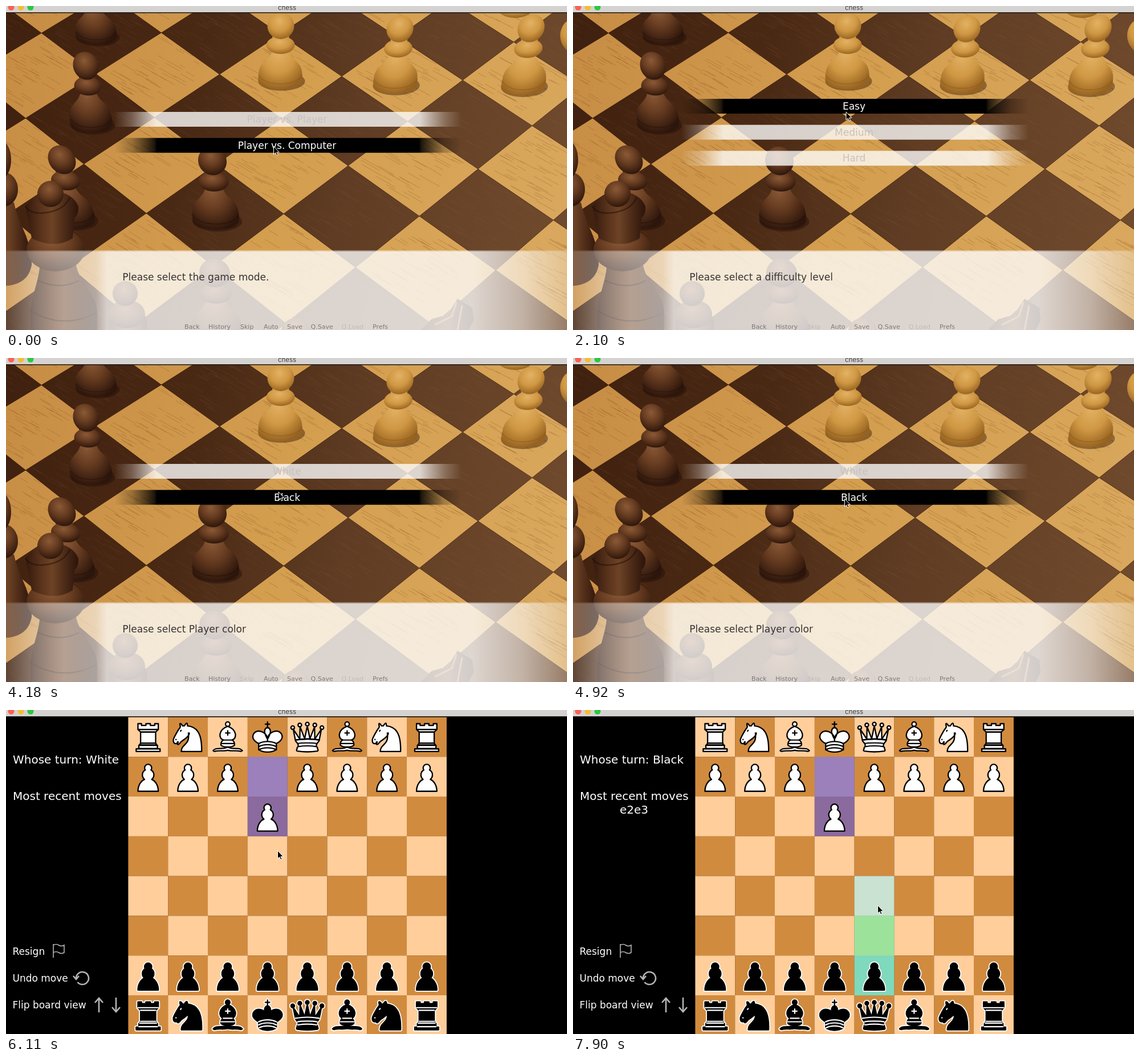
An HTML page for the animation above (8 s loop, 984 by 569 pixels).

```html
<!DOCTYPE html>
<html lang="en">
<head>
<meta charset="utf-8">
<title>chess</title>
<style>
html, body { margin: 0; width: 100%; height: 100%; overflow: hidden; background: #000; }
svg { display: block; width: 984px; height: 569px; }
text { font-family: "DejaVu Sans", sans-serif; font-size: 17px; }
.mid { text-anchor: middle; }
.side { fill: #fff; }
.big { font-size: 20px; }
.quick { font-size: 11px; fill: #6f6a66; fill-opacity: .85; }
.off { fill: #8f8681; fill-opacity: .32; }
.icon { fill: none; stroke: #b4b4b4; stroke-width: 2.6; }
</style>
</head>
<body>
<svg viewBox="0 0 984 569" xmlns="http://www.w3.org/2000/svg">
  <defs>
    <linearGradient id="darkTile" gradientUnits="userSpaceOnUse" x1="0" y1="120" x2="984" y2="330">
      <stop offset="0" stop-color="#40210f"/><stop offset=".33" stop-color="#4a2914"/>
      <stop offset=".62" stop-color="#5f3c23"/><stop offset="1" stop-color="#704a2d"/>
    </linearGradient>
    <linearGradient id="lightTile" gradientUnits="userSpaceOnUse" x1="0" y1="100" x2="984" y2="400">
      <stop offset="0" stop-color="#c78d45"/><stop offset=".5" stop-color="#d49e4f"/><stop offset="1" stop-color="#d9a85e"/>
    </linearGradient>
    <linearGradient id="darkBody">
      <stop offset="0" stop-color="#33190e"/><stop offset=".3" stop-color="#5a331b"/>
      <stop offset=".5" stop-color="#6d4325"/><stop offset=".75" stop-color="#4c2a17"/><stop offset="1" stop-color="#2a140b"/>
    </linearGradient>
    <radialGradient id="darkBall" cx=".45" cy=".32" r=".7">
      <stop offset="0" stop-color="#8b5a37"/><stop offset=".5" stop-color="#643a1f"/><stop offset="1" stop-color="#2c150b"/>
    </radialGradient>
    <radialGradient id="lightBall" cx=".45" cy=".32" r=".7">
      <stop offset="0" stop-color="#e3b264"/><stop offset=".55" stop-color="#cf9743"/><stop offset="1" stop-color="#96621f"/>
    </radialGradient>
    <linearGradient id="idleBar">
      <stop offset="0" stop-color="#fff" stop-opacity="0"/><stop offset=".05" stop-color="#fff" stop-opacity=".25"/>
      <stop offset=".12" stop-color="#fff" stop-opacity=".78"/><stop offset=".88" stop-color="#fff" stop-opacity=".78"/>
      <stop offset=".95" stop-color="#fff" stop-opacity=".25"/><stop offset="1" stop-color="#fff" stop-opacity="0"/>
    </linearGradient>
    <linearGradient id="hoverBar">
      <stop offset="0" stop-opacity="0"/><stop offset=".05" stop-opacity=".25"/>
      <stop offset=".115" stop-opacity=".85"/><stop offset=".123" stop-opacity="1"/>
      <stop offset=".877" stop-opacity="1"/><stop offset=".885" stop-opacity=".85"/>
      <stop offset=".95" stop-opacity=".25"/><stop offset="1" stop-opacity="0"/>
    </linearGradient>
    <linearGradient id="sayBox">
      <stop offset="0" stop-color="#fff" stop-opacity=".15"/><stop offset=".05" stop-color="#fff" stop-opacity=".4"/>
      <stop offset=".16" stop-color="#fff" stop-opacity=".6"/><stop offset=".18" stop-color="#fff" stop-opacity=".78"/>
      <stop offset=".83" stop-color="#fff" stop-opacity=".78"/><stop offset=".92" stop-color="#fff" stop-opacity=".58"/>
      <stop offset="1" stop-color="#fff" stop-opacity=".28"/>
    </linearGradient>
  </defs>

  <g id="photo"></g>
  <g id="say">
    <rect y="429" width="984" height="2" fill="url(#sayBox)" opacity=".55"/>
    <rect y="431" width="984" height="138" fill="url(#sayBox)"/>
    <text id="line" x="204.3" y="482" fill="#383432"></text>
  </g>
  <g id="quick"></g>
  <g id="menu"></g>

  <g id="game">
    <rect y="12" width="984" height="557"/>
    <g id="board"></g>
    <g id="marks"></g>
    <g id="men"></g>
    <text id="turn" class="side big" x="12" y="94"></text>
    <text class="side big" x="12" y="158">Most recent moves</text>
    <text id="moves" class="side big mid" x="107" y="182">e2e3</text>
    <text class="side" x="11.5" y="430">Resign</text>
    <text class="side" x="11.5" y="477">Undo move</text>
    <text class="side" x="11.5" y="524">Flip board view</text>
    <path class="icon" style="stroke-width:1.6" d="M83 411V435M83 413q5-3 9.500 0t9.500 0v13q-5 3-9.500 0t-9.500 0"/>
    <path class="icon" d="M125.500 478A11 11 0 1 0 123 471M118 467l5 6 5-6"/>
    <path class="icon" d="M163 531V507M156 514l7-8 7 8M193 505V529M186 522l7 8 7-8"/>
  </g>

  <rect width="984" height="11.500" fill="#d5d3d1"/>
  <rect y="11" width="984" height="1.500" fill="#1c1816"/>
  <circle cx="9" cy="2.300" r="5.500" fill="#fd5f57"/>
  <circle cx="26" cy="2.300" r="5.500" fill="#f8bc30"/>
  <circle cx="43" cy="2.300" r="5.500" fill="#2ac940"/>
  <text class="mid" x="493" y="6.500" style="font:11.5px Inter,sans-serif" fill="#444">chess</text>
  <path id="cursor" d="M0 0V14L3.200 11.200 5.300 16 7.500 15 5.400 10.400H9.700Z" stroke="#fff" stroke-width="1"/>
</svg>

<script>
const $ = id => document.getElementById(id);
const show = (el, on) => el.setAttribute('visibility', on ? 'visible' : 'hidden');

let seed = 7;
const rnd = () => (seed = seed * 16807 % 2147483647) / 2147483647;

// Perspective of the wooden board, with a slight lens bend: grid to stage
function spot(i, j) {
  const w = 1 - .036 * i + .042 * j;
  const x = (487 + 104 * i + 138.3 * j) / w;
  const y = (365 + 76.5 * i - 72.8 * j) / w + i * (1 + 1.5 * j);
  return x.toFixed(1) + ' ' + y.toFixed(1);
}

function woodBoard() {
  let dark = '', light = '', grain = '', weave = '';
  for (let i = -6; i < 4; i++) for (let j = -4; j < 6; j++) {
    const tile = `M${spot(i, j)}L${spot(i + 1, j)}L${spot(i + 1, j + 1)}L${spot(i, j + 1)}Z`;
    const even = (i + j) % 2 === 0;
    if (even) dark += tile; else light += tile;
    for (let k = 0; k < 45; k++) {
      const u = i + .02 + rnd() * .7, v = j + .05 + rnd() * .93, len = .08 + rnd() * .18;
      const dash = `M${spot(u, v)}L${spot(u + len, v + len * .12)}`;
      if (even) weave += dash; else grain += dash;
    }
  }
  return `<path d="${light}" fill="url(#lightTile)"/>
    <path d="${dark}" fill="url(#darkTile)" stroke="#3a1d0e" stroke-opacity=".5" stroke-width=".8"/>
    <path d="${grain}" stroke="#7a4616" stroke-opacity=".3"/>
    <path d="${weave}" stroke="#8f6242" stroke-opacity=".16"/>`;
}

// Turned pawn, in units of the head radius; 4.8 units from head centre to foot
function woodPawn(hx, hy, r, bx, foot, kind) {
  const edge = kind === 'dark' ? '#1f0d06' : '#8a5518', skin = `url(#${kind}Ball)`;
  return `<g transform="matrix(${r} 0 ${(bx - hx) / 4.8} ${(foot - hy) / 4.8} ${hx} ${hy})">
    <ellipse cx=".1" cy="4.2" rx="1.75" ry=".72" fill="#1c0c05" opacity=".4"/>
    <path fill="${skin}" d="M-.62 .7L-.62 1.9C-.8 2.6-1.45 2.65-1.6 3.4C-1.64 3.7-1.66 3.9-1.64 4.15C-1.55 4.6-.85 4.8 0 4.8C.85 4.8 1.55 4.6 1.64 4.15C1.66 3.9 1.64 3.7 1.6 3.4C1.45 2.65 .8 2.6 .62 1.9L.62 .7Z"/>
    <path fill="none" stroke="${edge}" stroke-opacity=".5" stroke-width=".06" d="M-1.62 3.75Q-1.2 4.4 0 4.4T1.62 3.75"/>
    <ellipse cy="1.45" rx="1.06" ry=".68" fill="${skin}"/>
    <circle r="1" fill="${skin}"/></g>`;
}

const ball = (x, y, rx, ry, kind = 'dark') =>
  `<ellipse cx="${x}" cy="${y}" rx="${rx}" ry="${ry}" fill="url(#${kind}Ball)"/>`;
const body = d => `<path d="${d}" fill="url(#darkBody)"/>`;

$('photo').innerHTML = woodBoard() +
  ball(893, 2, 32, 19, 'light') + ball(1002, 52, 30, 32, 'light') +
  woodPawn(150, -36, 22, 160, 68, 'dark') +
  woodPawn(482, 35, 23.5, 481, 146, 'light') +
  woodPawn(691, 40, 23.5, 681, 154, 'light') +
  woodPawn(921, 39, 23.5, 905, 157, 'light') +
  woodPawn(140, 105, 22.5, 151, 223, 'dark') +
  woodPawn(98, 270, 24, 120, 391, 'dark') +
  woodPawn(362, 272, 25, 369, 393, 'dark') +
  // tall piece at the left edge
  body('M-40 350L14 345C22 385 46 410 45 455C40 482 20 492-10 492L-40 490Z') +
  ball(-4, 322, 25, 30) + ball(-10, 270, 19, 34) +
  // queen
  body('M60 450C57 490 44 505 43 545V569H160V540C160 505 128 490 122 450Z') +
  '<path d="M43 535Q100 570 160 538M56 482Q95 500 128 482" fill="none" stroke="#1f0d06" stroke-opacity=".6" stroke-width="2"/>' +
  ball(87, 428, 51, 38) +
  body('M34 352Q54 324 80 324Q118 328 127 352Q128 366 120 373L117 408Q85 428 45 408Z') +
  '<path d="M34 352Q44 368 76 362Q104 356 112 336" fill="none" stroke="#1f0d06" stroke-opacity=".5" stroke-width="2.5"/>' +
  ball(78, 330, 23, 23) +
  woodPawn(366, 469, 27, 370, 590, 'dark') +
  body('M198 520Q178 535 180 569H248Q248 538 228 520Z') + ball(212, 541, 32, 25) + ball(209, 505, 22, 22) +
  ball(508, 571, 25, 23) +
  // knight
  body('M728 569L746 550L774 542L792 514L818 530L820 552L812 569Z') +
  '<path d="M752 560L782 545L790 520M800 526L792 569" fill="none" stroke="#c18a58" stroke-opacity=".7" stroke-width="3"/>';

$('quick').innerHTML = [['Back', 313], ['History', 355], ['Skip', 411], ['Auto', 452], ['Save', 493],
  ['Q.Save', 534.5], ['Q.Load', 588.5], ['Prefs', 643]].map(([s, x]) =>
  `<text class="quick${s === 'Q.Load' ? ' off' : ''}" x="${x}" y="567">${s}</text>`).join('');
const skip = $('quick').children[2];

// Flat pieces on a 45 unit square: [outline, inner lines]
const art = {
  p: ['M22.5 9c-2.21 0-4 1.79-4 4 0 .89.29 1.71.78 2.38C17.33 16.5 16 18.59 16 21c0 2.03.94 3.84 2.41 5.03-3 1.06-7.41 5.55-7.41 13.47h23c0-7.92-4.41-12.41-7.41-13.47 1.47-1.19 2.41-3 2.41-5.03 0-2.41-1.33-4.5-3.28-5.62.49-.67.78-1.49.78-2.38 0-2.21-1.79-4-4-4z', ''],
  r: ['M9 39h27v-3H9zM12 36v-4h21v4zM14 29.5V17h17v12.5zM14 29.5h17l1.5 2.5h-20zM14 17l-3-3h23l-3 3zM11 14V7.5h4v2h5v-2h5v2h5v-2h4V14z',
    'M12 35.5h21M13 31.5h19M14 29.5h17M14 17h17M11 14h23'],
  n: ['M22 10c10.5 1 16.5 8 16 29H15c0-9 10-6.5 8-21M24 18c.38 2.91-5.55 7.37-8 9-3 2-2.82 4.34-5 4-1.04-.94 1.41-3.04 0-3-1 0 .19 1.23-1 2-1 0-4 1-4-4 0-2 6-12 6-12s1.89-1.9 2-3.5c-.73-1-.5-2-.5-3 1-1 3 2.5 3 2.5h2s.78-2 2.500-3c1 0 1 3 1 3',
    'M9 25.3v.4M14.8 15l-.6 1'],
  b: ['M9 36c3.39-.97 10.11.43 13.5-2 3.39 2.43 10.11 1.03 13.5 2 0 0 1.65.54 3 2-.68.97-1.65.99-3 .5-3.39-.97-10.11.46-13.5-1-3.39 1.46-10.11.03-13.5 1-1.35.49-2.32.47-3-.5 1.35-1.46 3-2 3-2zM15 32c2.5 2.5 12.5 2.5 15 0 .5-1.5 0-2 0-2 0-2.5-2.5-4-2.5-4 5.5-1.5 6-11.5-5-15.5-11 4-10.5 14-5 15.5 0 0-2.5 1.5-2.5 4 0 0-.5.5 0 2zM25 8a2.5 2.5 0 1 1-5 0 2.5 2.5 0 1 1 5 0z',
    'M17.5 26h10M15 30h15M22.5 15.5v5M20 18h5'],
  k: ['M22.5 11.600V5.500M20 8h5M22.5 25s4.5-7.5 3-10.5c0 0-1-2.5-3-2.500s-3 2.5-3 2.500c-1.5 3 3 10.5 3 10.5M12.5 37c5.5 3.5 14.5 3.5 20 0v-7s9-4 6-10.5c-4-6.5-13.5-3.5-16 4V27v-3.5c-2.5-7.5-12-10.5-16-4-3 6.5 6 10.5 6 10.5z',
    'M12.5 30c5.5-3 14.5-3 20 0M12.500 33.5c5.5-3 14.5-3 20 0M12.500 37c5.5-3 14.5-3 20 0'],
  q: ['M9 26c8.5-1.5 21-1.5 27 0l2.5-12.5L31 25l-.3-14.1-5.2 13.6-3-14.5-3 14.5-5.2-13.6L14 25 6.5 13.5zM9 26c0 2 1.5 2 2.5 4 1 1.5 1 1 .5 3.5-1.5 1-1 2.5-1 2.5-1.5 1.5 0 2.5 0 2.5 6.5 1 16.5 1 23 0 0 0 1.5-1 0-2.5 0 0 .5-1.5-1-2.5-.5-2.5-.5-2 .5-3.5 1-2 2.5-2 2.5-4-8.5-1.5-18.5-1.5-27 0z' +
    [[6, 12], [14, 9], [22.5, 8], [31, 9], [39, 12]].map(([x, y]) => `M${x - 2} ${y}a2 2 0 1 1 4 0 2 2 0 1 1-4 0z`).join(''),
    'M9 26c8.5-1.5 18.5-1.5 27 0M11.5 30c3.5-1 18.5-1 22 0M12 33.5c6-1 15-1 21 0']
};
const CELL = 69.8, X0 = 214.4, Y0 = 12.4;

function piece(kind, col, row, black) {
  const [d, lines] = art[kind];
  const halo = black ? `<path d="${d}" fill="#fff" stroke="#fff" stroke-width="3.8"/>` : '';
  const lift = kind === 'p' ? -.7 : 0;
  return `<g transform="translate(${X0 + col * CELL} ${Y0 + row * CELL + lift}) scale(${CELL / 45})" stroke-linejoin="round" stroke-linecap="round">
    ${halo}<path d="${d}" fill="${black ? '#000' : '#fff'}" stroke="#000" stroke-width="1.5"/>
    <path d="${lines}" fill="none" stroke="${black ? '#fff' : '#000'}" stroke-width="1.4"/></g>`;
}
const square = (c, r, fill, a = 1) =>
  `<rect x="${X0 + c * CELL}" y="${Y0 + r * CELL}" width="${CELL + .1}" height="${CELL + .1}" fill="${fill}" fill-opacity="${a}"/>`;

let cells = '', men = '';
for (let r = 0; r < 8; r++) for (let c = 0; c < 8; c++)
  cells += square(c, r, (r + c) % 2 ? '#d18b3f' : '#ffce9b');
[...'rnbkqbnr'].forEach((k, c) => {
  men += piece(k, c, 0, false) + piece('p', c, c === 3 ? 2 : 1, false) + piece('p', c, 6, true) + piece(k, c, 7, true);
});
$('board').innerHTML = cells + square(3, 1, '#6a5acd', .667) + square(3, 2, '#6a5acd', .667);
$('men').innerHTML = men;

const HOVER = '#90ee90', PICKED = '#40e0d0', TARGET = '#afeeee';
function marks(t) {
  if (t < 7310) return '';
  if (t < 7610) return square(4, 6, HOVER, .667);
  return square(4, 6, PICKED, .667) + square(4, 5, TARGET, .667) + square(4, 4, TARGET, .667) +
    (t >= 7760 ? square(4, 5, HOVER, .667) : '');
}

// [time, prompt, first button top, labels]
const menus = [
  [0, 'Please select the game mode.', 186, ['Player vs. Player', 'Player vs. Computer']],
  [450, 'Please select a difficulty level', 163, ['Easy', 'Medium', 'Hard']],
  [2990, 'Please select Player color', 186, ['White', 'Black']]
];
// Pointer: [time, x, y]
const track = [
  [0, 469.5, 246.5], [1500, 469.5, 244.5], [1650, 473, 217], [1800, 478, 187.5], [2100, 479, 186],
  [3590, 480, 199], [3740, 479, 221], [3890, 478, 237], [4030, 478, 241], [4180, 478, 235],
  [4320, 478, 220], [4470, 478, 206], [4620, 477, 198], [4770, 477, 222], [4920, 476.5, 247],
  [6860, 482, 290], [7010, 503, 370], [7160, 517, 423], [7310, 525, 462],
  [7610, 526, 455], [7760, 530, 400], [7900, 534.5, 343]
];
const at = (list, t) => list.filter(e => e[0] <= t).pop();

function bars(top, labels, y) {
  return labels.map((s, k) => {
    const b = top + k * 45.7, on = y >= b - .5 && y <= b + 26;
    return `<rect x="190" y="${b}" width="609" height="26" fill="url(#${on ? 'hoverBar' : 'idleBar'})"/>
      <text class="mid" x="493" y="${Math.round(b + 19)}" fill="${on ? '#fff' : '#c9c1be'}">${s}</text>`;
  }).join('');
}

let last = '';
function draw(t) {
  const [step, x, y] = at(track, t), [start, prompt, top, labels] = at(menus, t);
  const key = [step, start, t >= 5520, t >= 5670, t >= 6110, t >= 6260].join();
  if (key === last) return;
  last = key;
  $('cursor').setAttribute('transform', `translate(${x} ${y})`);
  $('line').textContent = prompt;
  $('say').setAttribute('opacity', t < 5520 ? 1 : t < 5670 ? .5 : 0);
  $('menu').innerHTML = t < 5520 ? bars(top, labels, y) : '';
  skip.setAttribute('class', t < 450 ? 'quick' : 'quick off');
  show($('game'), t >= 6110);
  show($('moves'), t >= 6260);
  $('turn').textContent = 'Whose turn: ' + (t < 6260 ? 'White' : 'Black');
  $('marks').innerHTML = marks(t);
}

const begin = performance.now();
function tick() {
  draw((performance.now() - begin) % 8000);
  requestAnimationFrame(tick);
}
tick();
</script>
</body>
</html>
```
